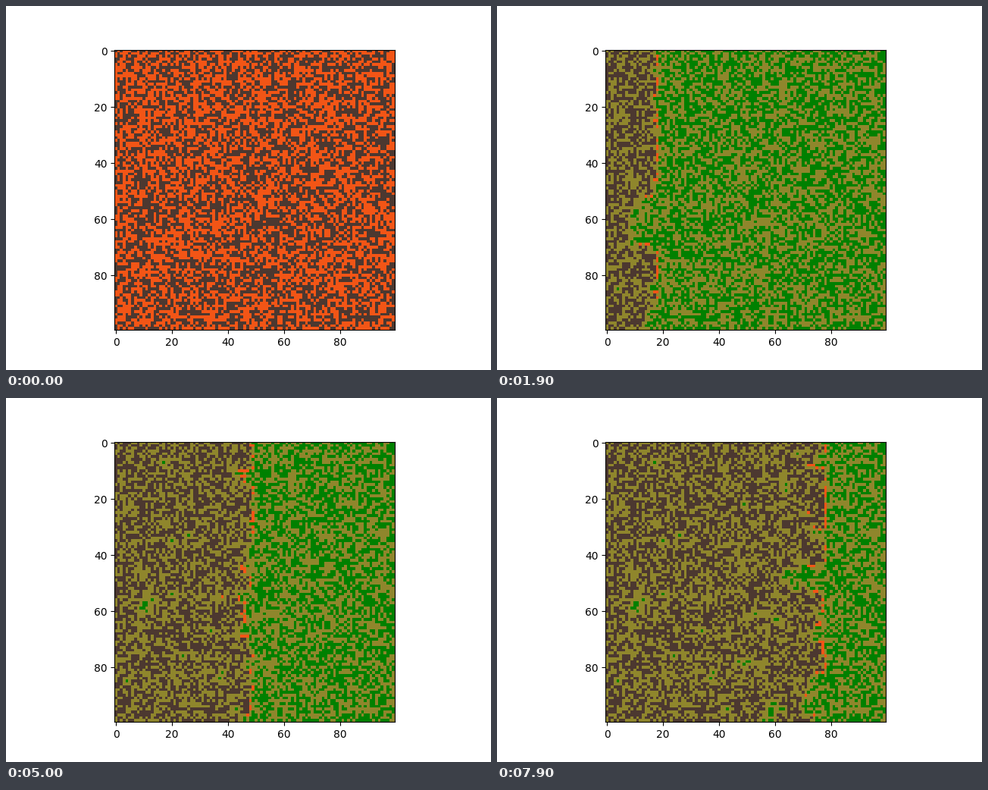
Animation of 640 by 480 pixels, one loop 8000 ms. Source, as a matplotlib script:

```python
import numpy as np
import matplotlib.pyplot as plt
from matplotlib.animation import FuncAnimation
from matplotlib.colors import ListedColormap

SIZE = 100
FRAMES = 80
DENSITY = 0.515
BURNT, EMPTY, TREE, FIRE = range(4)
COLORS = ["#4c3830", "#8f862c", "#008000", "#f25516"]


def plant(seed):
    rng = np.random.default_rng(seed)
    grid = np.where(rng.random((SIZE, SIZE)) < DENSITY, TREE, EMPTY)
    # A bare curved line holds the fire back for a while near the left edge
    rows = np.arange(50, 76)
    cols = np.rint(np.interp(rows, (50, 59, 70, 75), (14, 8, 8, 12))).astype(int)
    for row, a, b in zip(rows, cols, cols[1:]):
        grid[row, min(a, b):max(a, b) + 1] = EMPTY
    return grid


def ignite(grid):
    lit = grid.copy()
    lit[lit[:, 0] == TREE, 0] = FIRE
    return lit


def spread(grid):
    """Fire jumps to all eight neighbours and burns for one step."""
    burning = grid == FIRE
    pad = np.pad(burning, 1)
    wide = pad[:, :-2] | pad[:, 1:-1] | pad[:, 2:]
    near = wide[:-2] | wide[1:-1] | wide[2:]
    out = grid.copy()
    out[burning] = BURNT
    out[near & (grid == TREE)] = FIRE
    return out


def burn(seed):
    forest = plant(seed)
    states = [forest, ignite(forest)]
    while len(states) < FRAMES:
        states.append(spread(states[-1]))
    return states


def evenness(states):
    """Share of trees behind the ideal front that have already caught fire."""
    share = 0
    for i in range(10, FRAMES, 10):
        behind = states[i][:, :i]
        share += np.mean(behind[behind != EMPTY] != TREE)
    return share


# Keep the forest whose fire front stays straightest
states = max((burn(seed) for seed in range(80)), key=evenness)
# The opening picture has only two values, stretched over the whole colour map
states[0] = np.where(states[0] == TREE, FIRE, BURNT)

fig, ax = plt.subplots(figsize=(6.4, 4.8), dpi=100)
image = ax.imshow(states[0], cmap=ListedColormap(COLORS), vmin=BURNT, vmax=FIRE,
                  interpolation="nearest")


def update(i):
    image.set_data(states[i])
    return [image]


anim = FuncAnimation(fig, update, frames=FRAMES, interval=100, repeat=True,
                     repeat_delay=0)
plt.show()
```
